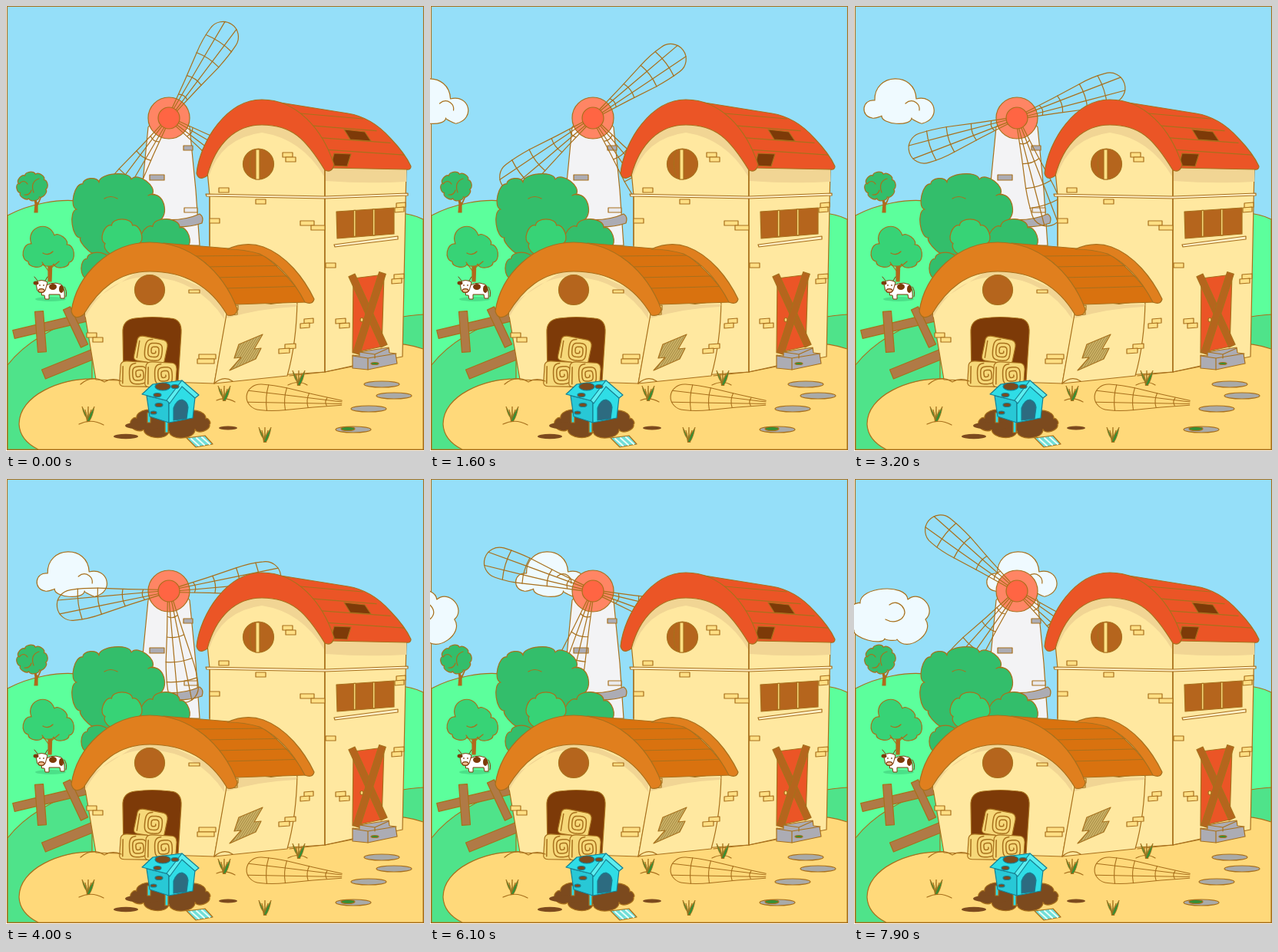
These frames come from a looping animation (544 by 580 pixels, 8000 ms). An HTML page with a canvas:

```html
<!DOCTYPE html>
<html lang="en">
<head>
<meta charset="utf-8">
<title>Farm with windmill</title>
<style>
html, body { margin: 0; width: 100%; height: 100%; overflow: hidden; background: #fff; }
canvas { display: block; }
</style>
</head>
<body>
<canvas id="stage" width="544" height="580"></canvas>
<script>
const ctx = document.getElementById('stage').getContext('2d');
const LOOP = 8000, STEP = 100, TAU = Math.PI * 2;
const CLOUD_SPEED = 34, SAIL_SPEED = 12; // px and degrees per second
const INK = '#a8701c', WOOD = '#b5651d', FENCE = '#b07a46', DARK = '#7d3a08', MUD = '#7c4a1e';
const WALL = '#ffe8a0', BRICK = '#ffdf84', TRIM = '#fff0c8', SHADE = '#f1d594', SAND = '#ffd97a';
const LEAF = '#33be6b', LEAF2 = '#37d376', GRASS = '#348f35', GREY = '#acacb4';
const RED = '#eb5526', ORANGE = '#e07f1e', CYAN = '#2fdde6', TEAL = '#177f91';

// Fill and outline an SVG path string or a Path2D.
function shape(d, fill, stroke = INK, width = 1.2) {
  const p = d instanceof Path2D ? d : new Path2D(d);
  if (fill) { ctx.fillStyle = fill; ctx.fill(p); }
  if (stroke) { ctx.strokeStyle = stroke; ctx.lineWidth = width; ctx.stroke(p); }
}
const line = (d, width, color = INK) => shape(d, null, color, width);

function oval(x, y, rx, ry, fill, stroke = INK) {
  const p = new Path2D();
  p.ellipse(x, y, rx, ry, 0, 0, TAU);
  shape(p, fill, stroke);
}

// Draw in a moved, turned (degrees) and scaled frame.
function at(x, y, deg, paint, sx = 1, sy = sx) {
  ctx.save();
  ctx.translate(x, y);
  ctx.rotate(deg * TAU / 360);
  ctx.scale(sx, sy);
  paint();
  ctx.restore();
}

// Straight board of width w between two points.
function plank(x, y, u, v, w, fill) {
  const k = w / 2 / Math.hypot(u - x, v - y), a = (y - v) * k, b = (u - x) * k;
  shape(`M${x + a},${y + b}L${u + a},${v + b}L${u - a},${v - b}L${x - a},${y - b}Z`, fill);
}

// Closed outline of outward bumps; each point is [x, y, bulge].
function bumps(pts, fill) {
  const p = new Path2D();
  p.moveTo(pts[0][0], pts[0][1]);
  pts.forEach(([x, y, k = 0.4], i) => {
    const [u, v] = pts[(i + 1) % pts.length];
    const ox = (v - y) * k, oy = (x - u) * k;
    p.bezierCurveTo(x + ox, y + oy, u + ox, v + oy, u, v);
  });
  p.closePath();
  shape(p, fill);
}

// n equal bumps around an ellipse.
function puff(x, y, rx, ry, n, turn, fill) {
  bumps(Array.from({ length: n }, (_, i) => {
    const a = (i + turn) / n * TAU;
    return [x + rx * Math.cos(a), y + ry * Math.sin(a)];
  }), fill);
}

function brick(x, y, w = 13, h = 6, tilt = 0, fill = BRICK) {
  shape(`M${x},${y}l${w},${tilt}v${h}l${-w},${-tilt}Z`, fill);
}

function brickPair(x, y, shift, w, tilt) {
  brick(x, y, w, 6, tilt);
  brick(x + shift, y + 6, w, 6, tilt);
}

function sky() {
  ctx.fillStyle = '#fff';
  ctx.fillRect(0, 0, 544, 580);
  shape('M1.5,.5H543.5V578.5H1.5Z', '#95dff9');
}

function clouds(t) {
  const x = CLOUD_SPEED * t / 1000;
  at(x - 108.8, 0, 0, () => {
    bumps([[24, 146, .72], [27, 123, .67], [81, 121, .78], [89, 153, .1], [75, 146, .3], [36, 143, .1]], '#effaff');
    line('M67,127Q74,121 81,126Q86,130 85,136');
  });
  at(x - 268.6, 0, 0, () => {
    bumps([[8, 162, .35], [70, 157, .6], [93, 183, .5], [56, 209, .15], [40, 208, .25], [0, 197, .6], [-1, 165, .2]], '#effaff');
    line('M46,164Q54,158 62,165Q70,174 62,182Q52,189 41,183');
  });
}

function hills() {
  const light = '#5cff9c', dark = '#4fe38a';
  shape('M2,273C30,258 70,250 100,255C160,268 205,300 232,345V578H2Z', light);
  shape('M505,269Q530,271 543,278V578H505Z', light);
  shape('M2,468Q35,425 112,402V578H2Z', dark);
  shape('M505,407Q525,403 543,402V578H505Z', dark);
  shape('M120,486C70,484 17,508 17,545Q18,566 42,578H543V447Q515,437 480,440L300,460Z', SAND);
}

function trees() {
  shape('M36,246L41,258L47,246L41,260V269H37L38,258Z', WOOD);
  puff(34, 235, 18, 16, 8, .3, LEAF);
  line('M36,243Q31,229 43,225M17,232Q23,225 28,232M24,246Q31,247 33,240');
  shape('M55,330H60L59,359H55Z', WOOD);
  bumps([[33, 310, .72], [63, 299, .35], [79, 311, .45], [82, 334, .4], [62, 336, .3], [48, 336, .4], [29, 333, .5]], LEAF2);
  line('M55,345L47,334M58,342L69,333M48,322Q55,326 61,320');
}

function cow() {
  oval(58, 382, 20, 3, '#4be088', null);
  shape('M46,369Q58,357 72,363Q77,368 76,381H71L70,376H56V382H51L50,377H47Z', '#fff', DARK, 1);
  oval(61, 366, 5, 4, DARK, null);
  oval(72, 369, 3, 5, DARK, null);
  shape('M39,360Q46,355 54,360L51,371Q46,376 41,371Z', '#fff', DARK, 1);
  oval(39, 361, 3.5, 2.5, DARK, null);
  line('M41,358L37,353M51,358L54,353M76,366Q80,372 78,379', 1, DARK);
  oval(46, 371, 4, 2.3, '#f3bd92', DARK);
  for (const x of [44, 49]) oval(x, 364, .8, 1, DARK, null);
}

function fence() {
  plank(10, 428, 107, 405, 11, FENCE);
  plank(49, 480, 113, 454, 13, FENCE);
  plank(43, 398, 47, 451, 11, FENCE);
  plank(79, 394, 102, 443, 10, FENCE);
}

function tower() {
  shape('M185,158L177,240L186,312H252L247,240L239,158Q212,120 185,158Z', '#f3f3f5');
  brick(187, 220, 19, 7, 0, GREY);
  brick(231, 182, 12, 6, 0, GREY);
  brick(232, 263, 17, 6, 0, '#e9e9ec');
  shape('M200,278Q230,281 252,271Q258,275 255,283Q232,291 200,286Z', GREY);
}

// One lattice sail pointing along +x.
function sail() {
  line('M12,-3.5L52,-10L90,-17Q110,-21 127,-20A20,20 0 0 1 127,20Q110,20 90,17L52,10L12,3.5');
  line('M12,-1.5L90,-6L145,-9M12,1.5L90,6L145,9');
  for (const r of [33, 59, 91, 117]) {
    const w = Math.min(20, r * .19);
    line(`M${r},${-w}Q${r + 4},0 ${r},${w}`);
  }
}

function windmill(t) {
  tower();
  oval(212, 146, 27, 27, '#ff8564');
  const turn = 33.7 + SAIL_SPEED * t / 1000;
  for (const quarter of [0, 90, 270]) at(212, 146, turn + quarter, sail);
  oval(212, 146, 14, 14, '#ff6543');
}

function bush() {
  bumps([[97, 302, .3], [92, 265, .32], [100, 232], [121, 230, .29], [163, 226], [190, 246, .5], [196, 281, 0], [180, 330, 0], [115, 322, .2]], LEAF);
  line('M128,251Q136,246 145,251M185,247Q190,244 194,246');
  puff(119, 342, 19, 18, 4, .5, LEAF);
  puff(207, 306, 30, 22, 5, .3, LEAF);
  puff(151, 303, 23, 21, 5, .25, LEAF2);
}

function tallBarn() {
  shape('M265,247L262,215Q278,158 333,150Q390,160 415,212V477L340,482H265Z', WALL);
  shape('M415,206L521,210L516,457L415,477Z', WALL);
  shape('M264,222Q280,172 333,165Q385,173 414,222V208Q380,150 333,150Q275,160 262,215Z', SHADE, null);
  shape('M416,211H521V229Q470,232 416,228Z', SHADE, null);
  line('M265,247V312M415,210V477');

  // Roof: tiled side, then the front arch
  shape('M345,124L445,140Q476,145 500,172Q520,193 527,209Q527,214 521,213L422,211L380,150Z', RED);
  for (let i = 0; i < 4; i++) line(`M${383 + 10.5 * i},${140 + 15.7 * i}L${464 + 18 * i},${147 + 15.7 * i}`);
  shape('M440,161L467,164L475,176L448,174Z', DARK);
  shape('M427,192L449,193L444,209L423,208Z', DARK);
  shape('M248,218C253,175 288,122 333,122C378,122 412,160 427,207Q424,218 415,214C390,173 372,155 333,155C298,155 273,180 262,221Q251,229 248,218Z', RED);

  shape('M260,245L415,248L523,244V247L415,251L261,248Z', TRIM);
  oval(328.5, 206, 20, 20, WOOD);
  shape('M325,187H330V226H325Z', BRICK);
  line('M320,189Q314,206 321,224');

  brickPair(360, 191, 4);
  brickPair(383, 280, 14, 18);
  brickPair(508, 257, -2, 12, -1);
  brickPair(505, 350, -3, 13, -1);
  brickPair(429, 408, 5, 13, -1);
  for (const [x, y] of [[277, 237], [325, 252], [265, 277], [416, 335]]) brick(x, y);

  shape('M430,268L505,263V297L431,303Z', WOOD);
  for (let i = 1; i < 3; i++) brick(427.5 + 25 * i, 268 - 1.6 * i, 2.5, 34, 0);
  shape('M427,311L510,300V304L428,314Z', TRIM);

  shape('M452,355L492,350L489,444L451,452Z', RED);
  oval(463, 409, 2, 2.5, SAND);
  plank(450, 351, 492, 443, 9, WOOD);
  plank(490, 348, 456, 453, 9, WOOD);
  shape('M460,451L498,445L499,452L507,453L509,466L471,474L451,472V455L460,456Z', GREY);
  line('M451,456L471,459L508,453M460,451L480,454L498,446M480,454V459M471,459V474');
  oval(480, 466, 5, 1.5, GRASS);
}

function bale() {
  shape('M-20,-12Q-19,-17 -12,-17L14,-16Q20,-15 20,-8L19,12Q18,17 12,16L-15,16Q-22,16 -21,9Z', '#f6d879');
  // Squarish spiral on the cut end
  const p = new Path2D();
  for (let a = 0; a < TAU * 2.7; a += .15) {
    const c = Math.cos(a), s = Math.sin(a), r = (2 + a * .75) / Math.pow(c ** 4 + s ** 4, .2);
    p.lineTo(4 + r * c * .9, r * s);
  }
  line(p, 1.5);
  line('M-17,-10V12', 1.5);
}

function lowBarn() {
  shape('M102,398Q120,350 187,336Q260,345 288,400L271,492L117,487Z', WALL);
  shape('M288,396L379,384Q378,440 366,482L271,492Z', WALL);
  shape('M103,406Q130,353 187,353Q250,356 284,408V380L187,336L103,390Z', SHADE, null);
  shape('M288,389H379L377,392Q330,394 287,407Z', SHADE, null);
  brickPair(105, 426, 8);
  brickPair(251, 454, -2, 22);
  brickPair(291, 391, -1, 11, -1);
  brickPair(388, 408, -5, 12, -1);
  brickPair(363, 441, -8, 14, -1);
  brick(238, 370, 14, 4);

  shape('M205,309L290,316L325,318Q360,340 392,386L298,389L260,335Z', '#d9720f');
  for (let i = 0; i < 4; i++) line(`M${245 + 13 * i},${326 + 14 * i}L${340 + 12.5 * i},${325 + 13.5 * i}`);
  shape('M288,317Q312,306 335,314C365,325 388,355 401,382Q399,390 389,386Q365,340 330,323Q310,317 288,317Z', ORANGE);
  shape('M85,398C92,350 135,308 187,308C240,308 282,345 301,395Q300,405 288,403C266,365 232,346 187,346C146,346 120,370 101,402Q89,411 85,398Z', ORANGE);

  oval(187, 370, 19.5, 19.5, WOOD);
  shape('M153,484L152,426Q151,409 168,407Q190,404 214,407Q229,408 228,426L224,488Z', DARK);
  at(189, 449, 9, bale);
  at(169, 480, 1, bale);
  at(202, 481, 1, bale);

  const bolt = new Path2D('M334,428L303,441L297,459L306,458L291,475L325,460L332,446L323,447Z');
  shape(bolt, '#cdb266');
  ctx.save();
  ctx.clip(bolt);
  for (let x = 265; x < 340; x += 3) line(`M${x},478l32,-52`, .8, '#98803c');
  ctx.restore();
}

function grass(x, y) {
  for (let i = -2; i < 3; i++) {
    const h = 19 - 4 * (i & 1);
    shape(`M${x - 1.5},${y}Q${x + i},${y - h / 2} ${x + i * 4},${y - h}Q${x + i * 3},${y - 6} ${x + 1.5},${y}Z`, GRASS, INK, .8);
  }
}

function yard() {
  line('M97,493Q112,480 128,490Q138,484 150,489M95,545Q111,537 127,546M271,492Q283,481 295,489M369,482L415,477L451,469M274,514Q285,509 298,516M367,494Q381,487 392,494');
  for (const [x, y] of [[107, 541], [284, 514], [381, 494], [337, 568]]) grass(x, y);
  at(448, 518, 184, sail, .92, .84);
  for (const [x, y] of [[489, 493], [505, 508], [472, 525], [452, 552]]) oval(x, y, 23, 4, '#a9aaa8');
  oval(445, 551, 9, 2.5, GRASS);
}

function kennel() {
  puff(214, 543, 52, 11, 9, .3, MUD);
  for (const [x, y, r] of [[156, 561, 16], [180, 547, 25], [289, 550, 12]]) oval(x, y, r, r / 5, MUD, null);
  plank(209, 538, 209, 556, 4, CYAN);
  plank(186, 530, 186, 543, 4, CYAN);
  shape('M183,508L212,515V543L187,535Z', '#28c8d6', TEAL);
  shape('M212,515L229,493L246,510L243,537L212,543Z', CYAN, TEAL);
  shape('M218,540V524Q222,513 229,513Q236,515 237,523L235,538Z', '#2d6b80', TEAL);
  shape('M191,493L229,488L212,515L177,506Z', CYAN, TEAL);
  shape('M229,488L251,507L246,511L229,496L213,518L209,514Z', '#5ceef0', TEAL);
  for (const [x, y, r] of [[204, 496, 10], [197, 507, 5], [220, 496, 5], [199, 520, 5], [192, 530, 4]]) oval(x, y, r, r / 2, MUD, TEAL);
  shape('M235,563L259,560L269,571L247,575Z', '#70ded8');
  for (let i = 0; i < 3; i++) line(`M${241 + 7 * i},${564 - i}l10,9`, 2, '#e6fff6');
}

function draw(t) {
  sky();
  clouds(t);
  hills();
  trees();
  cow();
  windmill(t);
  bush();
  fence();
  tallBarn();
  lowBarn();
  yard();
  kennel();
}

ctx.lineJoin = ctx.lineCap = 'round';
const start = performance.now();
let shown = -1;
function tick() {
  const t = Math.floor((performance.now() - start) % LOOP / STEP) * STEP;
  if (t !== shown) draw(shown = t);
  requestAnimationFrame(tick);
}
tick();
</script>
</body>
</html>
```
